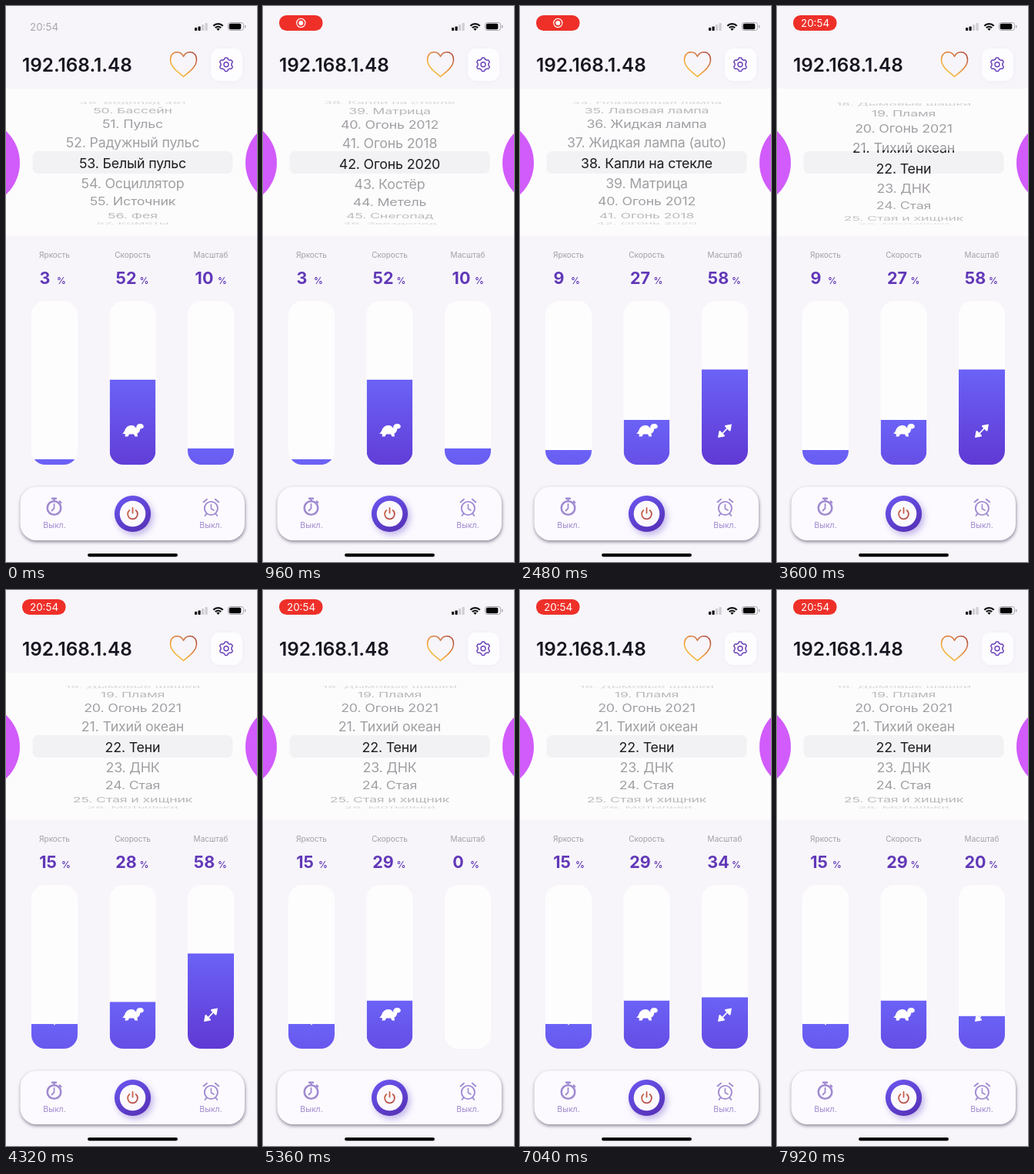
An HTML page with a canvas that plays this animation: 326x720 px, repeating every 8 s.

```html
<!DOCTYPE html>
<html lang="ru">
<head>
<meta charset="utf-8">
<style>
html, body { margin: 0; width: 100%; height: 100%; overflow: hidden; background: #f7f5fa; }
canvas { display: block; width: 326px; height: 720px; }
</style>
</head>
<body>
<canvas id="stage"></canvas>
<script>
const W = 326, H = 720, LOOP = 8000, STEP = 80;
const canvas = document.getElementById('stage');
const dpr = window.devicePixelRatio || 1;
canvas.width = W * dpr;
canvas.height = H * dpr;
const c = canvas.getContext('2d');
const FONT = 'Inter, Roboto, sans-serif';

const FIRST = 16;
const NAMES = ['Вихри', 'Облака', 'Дымовые шашки', 'Пламя', 'Огонь 2021', 'Тихий океан', 'Тени', 'ДНК',
  'Стая', 'Стая и хищник', 'Мотыльки', 'Лампа с мотыльками', 'Змейки', 'Спирали', 'Волны', 'Лава', 'Плазма',
  'Кипение', 'Плазменная лампа', 'Лавовая лампа', 'Жидкая лампа', 'Жидкая лампа (auto)', 'Капли на стекле',
  'Матрица', 'Огонь 2012', 'Огонь 2018', 'Огонь 2020', 'Костёр', 'Метель', 'Снегопад', 'Звездопад',
  'Пузыри', 'Водопад', 'Водопад 4в1', 'Бассейн', 'Пульс', 'Радужный пульс', 'Белый пульс', 'Осциллятор',
  'Источник', 'Фея', 'Кометы'];

// Keys are [start, end, from, to, easing]
const out = u => 1 - (1 - u) ** 2;
const smooth = u => u * u * (3 - 2 * u);
const WHEEL = [[200, 1760, 53, 38, out], [2560, 3560, 38, 21.7, out], [3560, 3760, 21.7, 22, smooth]];
const SLIDERS = [
  { x: 33, label: 'Яркость', icon: sun, keys: [[1720, 1960, 3.3, 9, smooth], [3760, 4120, 9, 15.1, smooth]] },
  { x: 134.5, label: 'Скорость', icon: turtle, keys: [[1960, 2200, 52, 27.4, smooth], [4160, 4440, 27.4, 29.45, smooth]] },
  { x: 236, label: 'Масштаб', icon: arrows, keys: [[2200, 2400, 10, 58.3, smooth], [4480, 5280, 58.3, 0, smooth],
    [5360, 6230, 0, 45.5, smooth], [6400, 7600, 45.5, 20, smooth]] }
];

function valueAt(keys, t) {
  let v = keys[0][2];
  for (const [a, b, from, to, ease] of keys) {
    if (t >= a) v = from + (to - from) * ease(Math.min(1, (t - a) / (b - a)));
  }
  return v;
}

function box(x, y, w, h, r, fill) {
  c.fillStyle = fill;
  c.beginPath();
  c.roundRect(x, y, w, h, r);
  c.fill();
}
function disc(x, y, r, fill) {
  c.fillStyle = fill;
  c.beginPath();
  c.arc(x, y, r, 0, 7);
  c.fill();
}
function line(d, color, width) {
  c.strokeStyle = color;
  c.lineWidth = width;
  c.lineCap = c.lineJoin = 'round';
  c.stroke(new Path2D(d));
}
function text(s, x, y, size, color, weight = 400, align = 'center') {
  c.font = `${weight} ${size}px ${FONT}`;
  c.textAlign = align;
  c.textBaseline = 'alphabetic';
  c.fillStyle = color;
  c.fillText(s, x, y);
}
function gradient(x0, y0, x1, y1, ...colors) {
  const g = c.createLinearGradient(x0, y0, x1, y1);
  colors.forEach((k, i) => g.addColorStop(i / (colors.length - 1), k));
  return g;
}
function shadow(color, blur, x, y, draw) {
  c.save();
  c.shadowColor = color;
  c.shadowBlur = blur * dpr;
  c.shadowOffsetX = x * dpr;
  c.shadowOffsetY = y * dpr;
  draw();
  c.restore();
}

function statusBar(t) {
  const pill = Math.min(1, t / 240);
  if (pill < 1) text('20:54', 49.5, 31.5, 13.4, '#aaa8ad');
  c.globalAlpha = pill;
  box(21, 12, 56.5, 20, 9.5, '#ee3029');
  if (t < 2960) {
    disc(49.3, 22, 3, '#fff');
    c.beginPath();
    c.arc(49.3, 22, 5.6, 0, 7);
    c.strokeStyle = '#fff';
    c.lineWidth = 1.2;
    c.stroke();
  } else text('20:54', 49.5, 26.8, 13.4, '#fff');
  c.globalAlpha = 1;

  [4, 5.5, 8, 10].forEach((h, i) => box(245 + i * 4.5, 32 - h, 3.2, h, 0.8, i < 2 ? '#111' : '#cfced2'));
  c.lineCap = 'butt';
  c.strokeStyle = '#111';
  c.lineWidth = 2.3;
  for (const r of [5.2, 8.8]) {
    c.beginPath();
    c.arc(275.5, 32, r, -2.35, -0.79);
    c.stroke();
  }
  c.fillStyle = '#111';
  c.beginPath();
  c.moveTo(275.5, 32);
  c.arc(275.5, 32, 3, -2.35, -0.79);
  c.fill();
  c.beginPath();
  c.roundRect(288.5, 21.5, 20, 10, 3);
  c.strokeStyle = '#a5a4a8';
  c.lineWidth = 1;
  c.stroke();
  box(289.8, 22.8, 15.5, 7.4, 1.8, '#050505');
  box(310, 24.8, 1.4, 3.6, 0.7, '#a5a4a8');
}

function header() {
  text('192.168.1.48', 21, 84.5, 24.3, '#17151f', 600, 'left');
  line('M230.5 91.5C226 87 213.5 80 213.5 69.5C213.5 62.5 218 59.8 222 59.8C226 59.8 229 62 230.5 65.5' +
    'C232 62 235 59.8 239 59.8C243 59.8 247.5 62.5 247.5 69.5C247.5 80 235 87 230.5 91.5Z',
    gradient(216, 92, 242, 60, '#f7d23c', '#ee9336', '#b8523f'), 1.5);
  shadow('rgba(120,100,160,.05)', 5, 0, 1, () => box(266, 55, 41, 42, 11, '#fdfcfe'));
  let d = '';
  for (let i = 0; i <= 96; i++) {
    const a = i / 96 * Math.PI * 2;
    const r = 7.9 + Math.max(-0.9, Math.min(0.9, 1.5 * Math.cos(6 * a)));
    d += `${i ? 'L' : 'M'}${286 + r * Math.sin(a)} ${75.7 - r * Math.cos(a)}`;
  }
  line(d + 'Z', '#6840b8', 1.5);
  line('M289 75.7a3 3 0 1 1 -6 0a3 3 0 1 1 6 0Z', '#6840b8', 1.4);
}

function rows(pos, color) {
  const angle = 19.4 * Math.PI / 180, radius = 80;
  for (let n = Math.ceil(pos - 4.5); n <= pos + 4.5; n++) {
    const a = (n - pos) * angle, k = Math.cos(a);
    if (k <= 0.03 || !NAMES[n - FIRST]) continue;
    c.save();
    c.translate(164.5, 203.3 + radius * Math.sin(a));
    c.scale(1, k);
    c.globalAlpha = Math.min(1, 0.15 + k * 1.1);
    text(`${n}. ${NAMES[n - FIRST]}`, 0, 6.4, 17.8, color);
    c.restore();
  }
}

function wheel(pos) {
  box(0, 107, W, 191, 0, '#fdfcfd');
  c.letterSpacing = '-0.17px';
  rows(pos, '#a09ea2');
  box(34.5, 188, 260, 29, 7, '#f2f1f3');
  c.save();
  c.beginPath();
  c.rect(34, 187, 261, 32);
  c.clip();
  rows(pos, '#1d1c20');
  c.restore();
  c.letterSpacing = '0px';
  disc(-38, 203, 56, '#d15cfb');
  disc(367, 203, 56, '#d15cfb');
}

function sun() {
  disc(63, 551, 5, '#fff');
  for (let i = 0; i < 8; i++) {
    const a = i * Math.PI / 4, x = Math.cos(a), y = Math.sin(a);
    line(`M${63 + x * 8} ${551 + y * 8}L${63 + x * 11.5} ${551 + y * 11.5}`, '#fff', 1.7);
  }
}
function turtle() {
  c.fillStyle = '#fff';
  c.fill(new Path2D('M151 553.5C153 552.5 153.5 551 154.5 549C156 545 159.5 543 163 543C166 543 168.5 545 169.3 547.5' +
    'C168.5 543.5 171 541 174 541C177.5 541 179 543 178.8 545C178.5 547 176 547.6 174.2 547.6' +
    'C174.2 551 172.5 552.8 170.5 553.5L171 557.5H167.5L166 554.5H160L158.5 557.5H154.5L155 554.5Z'));
}
function arrows() {
  c.fillStyle = '#fff';
  c.fill(new Path2D('M266.5 543L275 541.5L273.5 550Q272.5 551 271.5 550L266.5 545Q265.5 544 266.5 543Z' +
    'M258.5 550.5L257 559L265.5 557.5Q266.5 556.5 265.5 555.5L260.5 550.5Q259.5 549.5 258.5 550.5Z'));
  line('M262 554.5L270 546', '#fff', 1.8);
}

// The number follows the bar one step late
function slider({ x, label, icon, keys }, t) {
  const v = Math.round(valueAt(keys, t - STEP));
  const w = 60, mid = x + w / 2, bottom = 594, full = 212;
  const two = v > 9, top = bottom - full * valueAt(keys, t) / 100;
  text(label, mid, 326, 10, '#a19fa8');
  text(v, mid - (two ? 8.5 : 12.5), 360, 21.5, '#6138b8', 700);
  text('%', mid + (two ? 9 : 3), 360, 11.8, '#6138b8', 600, 'left');
  box(x, bottom - full, w, full, 18, '#fefdfe');
  c.save();
  c.beginPath();
  c.roundRect(x, bottom - full, w, full, 18);
  c.clip();
  c.beginPath();
  c.rect(x, top, w, bottom - top);
  c.clip();
  c.fillStyle = gradient(0, top, 0, top + 125, '#6b62f6', '#6038d3');
  c.fillRect(x, top, w, bottom - top);
  icon();
  c.restore();
}

function footer() {
  shadow('rgba(50,40,70,.55)', 4, 0.5, 2, () => box(18.5, 622.5, 291.5, 69.5, 21, '#fcfaff'));
  const lilac = '#a08bd0';
  line('M71.3 650a8.8 8.8 0 1 1 -17.6 0a8.8 8.8 0 1 1 17.6 0Z', lilac, 2.6);
  line('M60 637.8H65M62.5 638V641M69.8 641.5L71.2 643', lilac, 2.4);
  line('M62.5 645V650.5L59.5 653.5', lilac, 1.8);
  line('M275 650.5a8.6 8.6 0 1 1 -17.2 0a8.6 8.6 0 1 1 17.2 0Z', lilac, 1.9);
  line('M256.5 642.5L261 638.8M276.3 642.5L271.8 638.8M260.5 657.5L258.5 660M272.3 657.5L274.3 660', lilac, 1.9);
  line('M266.4 645.5V651L270 653', lilac, 1.6);
  text('Выкл.', 63, 676, 10.5, lilac);
  text('Выкл.', 266, 676, 10.5, lilac);

  shadow('rgba(105,75,200,.4)', 9, 3, 4, () =>
    disc(164.5, 657.5, 23.6, gradient(150, 634, 178, 682, '#6a55ee', '#5530b5')));
  disc(164.5, 657.5, 16.8, '#fbf9fe');
  const red = gradient(158, 650, 171, 665, '#d06a4b', '#b04a48');
  line('M160.4 653A6.4 6.4 0 1 0 168.6 653', red, 1.8);
  line('M164.5 650V656.5', red, 1.8);
  box(106, 709, 117, 4.2, 2.1, '#050505');
}

function frame(now) {
  const t = Math.floor(now % LOOP / STEP) * STEP;
  c.setTransform(dpr, 0, 0, dpr, 0, 0);
  box(0, 0, W, H, 0, '#f7f5fa');
  statusBar(t);
  header();
  wheel(valueAt(WHEEL, t));
  SLIDERS.forEach(s => slider(s, t));
  footer();
  requestAnimationFrame(frame);
}
requestAnimationFrame(frame);
</script>
</body>
</html>
```
